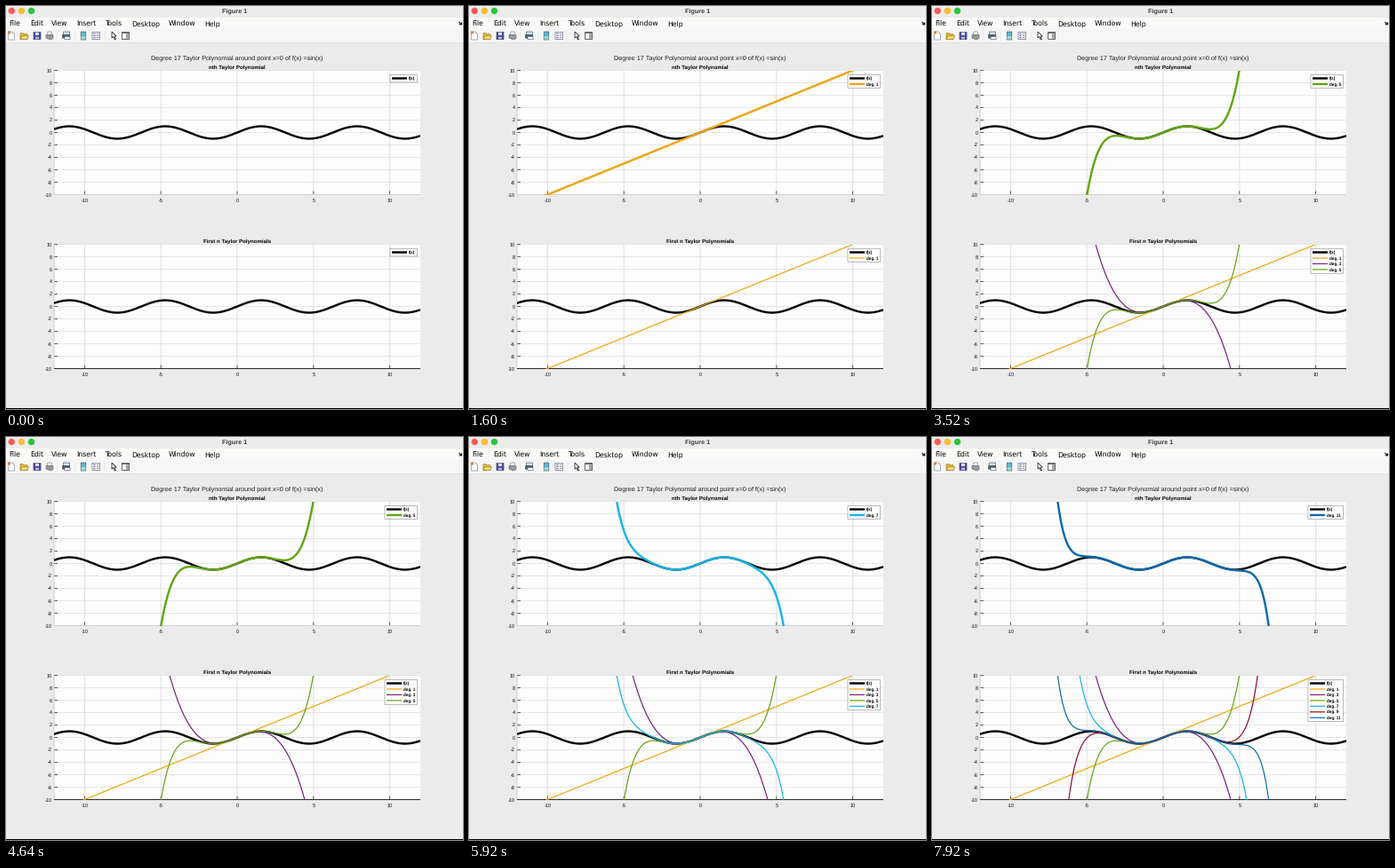
Write a matplotlib script that moves like this. It is 514 px wide and 454 px high and loops after 8000 ms.

```python
import math

import matplotlib.pyplot as plt
import numpy as np
from matplotlib.animation import FuncAnimation
from matplotlib.patches import Circle, Polygon, Rectangle

W, H, DPI = 514, 454, 64
PT = 72 / DPI                      # points per pixel
FRAMES, STEP_MS = 100, 80
FIRST, PERIOD = 10, 16.25          # first new degree and spacing, in frames

LEFT, RIGHT = 54, 466
X_SCALE, Y_SCALE = (RIGHT - LEFT) / 24, 7
TOP_Y, LOW_Y, PANEL_H = 72.5, 268.5, 140
ROW = 6.45
THICK, THIN = 2.4, 1.2

DEGREES = [1, 3, 5, 7, 9, 11]
COLORS = ["#eda50f", "#75207f", "#62a512", "#14b4ea", "#920a26", "#0a69ae"]
INK = "#111111"

plt.rcParams["text.hinting"] = "none"
plt.rcParams["font.family"] = "Liberation Sans"
plt.rcParams["path.snap"] = False

fig = plt.figure(figsize=(W / DPI, H / DPI), dpi=DPI, facecolor="#ebebeb")
ax = fig.add_axes([0, 0, 1, 1])
ax.set_xlim(0, W)
ax.set_ylim(H, 0)
ax.axis("off")


def rect(x, y, w, h, color, edge="none", lw=0.6, z=1):
    return ax.add_patch(Rectangle((x, y), w, h, facecolor=color,
                                  edgecolor=edge, linewidth=lw * PT, zorder=z))


def line(xs, ys, color=INK, lw=1.0, z=2):
    return ax.plot(xs, ys, color=color, lw=lw * PT, zorder=z,
                   solid_capstyle="butt", solid_joinstyle="round")[0]


def label(x, y, text, size, ha="left", color=INK, z=6, **kw):
    return ax.text(x, y, text, fontsize=size * PT, ha=ha, va="baseline",
                   color=color, zorder=z, **kw)


def poly(points, color, edge="none", lw=0.6):
    ax.add_patch(Polygon(points, facecolor=color, edgecolor=edge,
                         linewidth=lw * PT, zorder=3))


def px(x):
    return LEFT + (x + 12) * X_SCALE


def py(y, top):
    return top + (10 - y) * Y_SCALE


def draw_window():
    rect(0, 0, W, 13, "#ececec")
    for x, c in ((6.3, "#fb5b55"), (17.4, "#fbbb2e"), (28.5, "#28c53f")):
        ax.add_patch(Circle((x, 5.5), 3.7, facecolor=c, edgecolor="none", zorder=3))
    label(257, 8, "Figure 1", 7.3, "center", "#3c3c3c", weight="bold")

    rect(0, 13, W, 13, "#fafaf8")
    rect(0, 26, W, 15, "#f6f6f6")
    line([0, W], [41.5, 41.5], "#e2e2e2", 1)
    menu = (("File", 3), ("Edit", 27), ("View", 51), ("Insert", 79),
            ("Tools", 111), ("Desktop", 141.5), ("Window", 183), ("Help", 223))
    for name, x in menu:
        label(x, 22, name, 7.7, color="black", family="DejaVu Sans")
    line([509.5, 512.5], [18, 20.8], "black", 1.1)
    line([512.5, 512.5, 509.8], [18.4, 20.8, 20.8], "black", 1.1)
    line([0, W], [453.5, 453.5], "black", 1, 5)


def draw_toolbar():
    # new, open
    poly([(2.5, 29), (7, 29), (9.5, 31.5), (9.5, 38), (2.5, 38)], "white", "#6c7a90")
    rect(2, 28.5, 3, 3, "#e0823c", z=4)
    poly([(16, 30.5), (19, 30.5), (20, 31.7), (24, 31.7), (24, 37.5), (16, 37.5)],
         "#e5b93d", "#94761f")
    poly([(16, 37.5), (18, 33.5), (25.5, 33.5), (24, 37.5)], "#f7dc74", "#94761f")
    # save, print
    rect(31, 29.5, 8, 8, "#4c4f9e", "#2d2f63", z=3)
    rect(33, 29.8, 4, 3, "#dfe3f4", z=4)
    rect(33, 34.8, 4, 2.4, "#b7bbd8", z=4)
    poly([(47, 29), (51, 29), (52, 32.5), (46, 32.5)], "white", "#777777")
    poly([(45, 32.5), (53, 32.5), (53, 36.5), (50, 38), (45, 36)], "#9a9a9a", "#666666")
    # preview
    rect(64.5, 29, 7, 4, "#d5e4f2", "#34506e", z=3)
    rect(63.5, 32.5, 8, 3.6, "#506579", "#2d3a48", z=3)
    rect(66, 34.5, 6, 3.2, "white", "#44586c", z=4)
    # colour bar and legend
    rect(84.2, 29, 5.6, 9, "#5fb7d6", "#2f4f66", z=3)
    rect(84.6, 34, 4.8, 3.5, "#a5d8c4", z=4)
    rect(97, 29.3, 8.6, 8.2, "white", "#4e5480", z=3)
    for y, c in ((31.3, "#3b54b5"), (33.5, "#b5473b"), (35.7, "#3b54b5")):
        line([98.3, 100.6], [y, y], c, 1, 5)
        line([101.6, 104.5], [y, y], "#666666", 0.7, 5)
    # pointer and inspector
    poly([(119, 29), (119, 36), (120.7, 34.6), (122.4, 38),
          (123.5, 37.4), (122, 34.2), (124.2, 34)], "white", "#222222", 0.8)
    rect(130.5, 29.5, 8, 8, "white", "#444444", 0.8, z=3)
    rect(134.8, 31.2, 3, 5.6, "#9aa1aa", z=4)
    line([130.5, 138.5], [30.2, 30.2], "#444444", 1, 5)
    for x in (57.5, 77.5, 111):
        line([x, x], [29, 39], "#e6e6e6", 0.7)


def draw_panel(top, title, axis_color):
    base = top + PANEL_H
    rect(LEFT, top, RIGHT - LEFT, PANEL_H, "#fdfdfd")
    for v in range(-10, 11, 2):
        y = py(v, top)
        line([LEFT, RIGHT], [y, y], "#e6e6e6", 1)
        line([LEFT, LEFT + 4], [y, y], "#3a3a3a", 0.8, 3)
        label(51.8, y + 2, str(v), 5.5, "right")
    for v in range(-10, 11, 5):
        x = px(v)
        line([x, x], [top, base], "#dedede", 1)
        line([x, x], [base - 4, base], "#3a3a3a", 0.8, 3)
        label(x, base + 8, str(v), 5.5, "center")
    line([LEFT, LEFT], [top, base], "#c4c4c4", 0.8, 3)
    line([LEFT, RIGHT], [base, base], axis_color, 1, 3)
    label(260, top - 2, title, 6.1, "center", "black", weight="bold")


def curve(fn, top, color, lw, z):
    x = np.linspace(-12, 12, 1201)
    y = np.clip(fn(x), -60, 60)
    art = line(px(x), py(y, top), color, lw, z)
    art.set_clip_path(Rectangle((LEFT, top), RIGHT - LEFT, PANEL_H,
                                transform=ax.transData))
    return art


def taylor(n):
    def fn(x):
        return sum((-1) ** (k // 2) * x ** k / math.factorial(k)
                   for k in range(1, n + 1, 2))
    return fn


def legend(top, rows, x0):
    """rows: (text, colour, width); x0: left edge of the box."""
    arts = [rect(x0, top + 5, 462.5 - x0, ROW * len(rows) + 2,
                 "white", "#9c9c9c", 0.7, z=7)]
    for i, (text, color, lw) in enumerate(rows):
        y = top + 9 + i * ROW
        arts.append(line([x0 + 2, x0 + 19], [y, y], color, lw, 8))
        arts.append(label(x0 + 20.7, y + 1.6, text, 4.6, color="black", z=8,
                          weight="bold"))
    return arts


def build_stages():
    """Artists shown only in each stage, and those that stay once drawn."""
    base = ("f(x)", "black", THICK)
    only = [legend(TOP_Y, [base], 432) + legend(LOW_Y, [base], 432)]
    kept = [[]]
    thin = [base]
    for i, (n, c) in enumerate(zip(DEGREES, COLORS)):
        name = f"deg. {n}"
        thin = thin + [(name, c, THIN)]
        x0 = 423 if n > 9 else 426
        only.append([curve(taylor(n), TOP_Y, c, THICK, 5)]
                    + legend(TOP_Y, [base, (name, c, THICK)], x0)
                    + legend(LOW_Y, thin, x0))
        kept.append([curve(taylor(n), LOW_Y, c, THIN, 5 + i * 0.1)])
    return only, kept


draw_window()
draw_toolbar()
label(260, 60.2, "Degree 17 Taylor Polynomial around point x=0 of f(x) =sin(x)",
      7.27, "center", "#1c1c1c")
draw_panel(TOP_Y, "nth Taylor Polynomial", "#d0d0d0")
draw_panel(LOW_Y, "First n Taylor Polynomials", "#2a2a2a")
for panel_top in (TOP_Y, LOW_Y):
    curve(np.sin, panel_top, "black", THICK, 4)
only, kept = build_stages()
starts = [math.ceil(FIRST + PERIOD * k - 0.5) for k in range(len(DEGREES))]


def update(frame):
    stage = sum(frame >= s for s in starts)
    for i, (now, stay) in enumerate(zip(only, kept)):
        for art in now:
            art.set_visible(i == stage)
        for art in stay:
            art.set_visible(i <= stage)
    return []


anim = FuncAnimation(fig, update, frames=FRAMES, interval=STEP_MS,
                     repeat=True, repeat_delay=0, blit=False)
plt.show()
```
